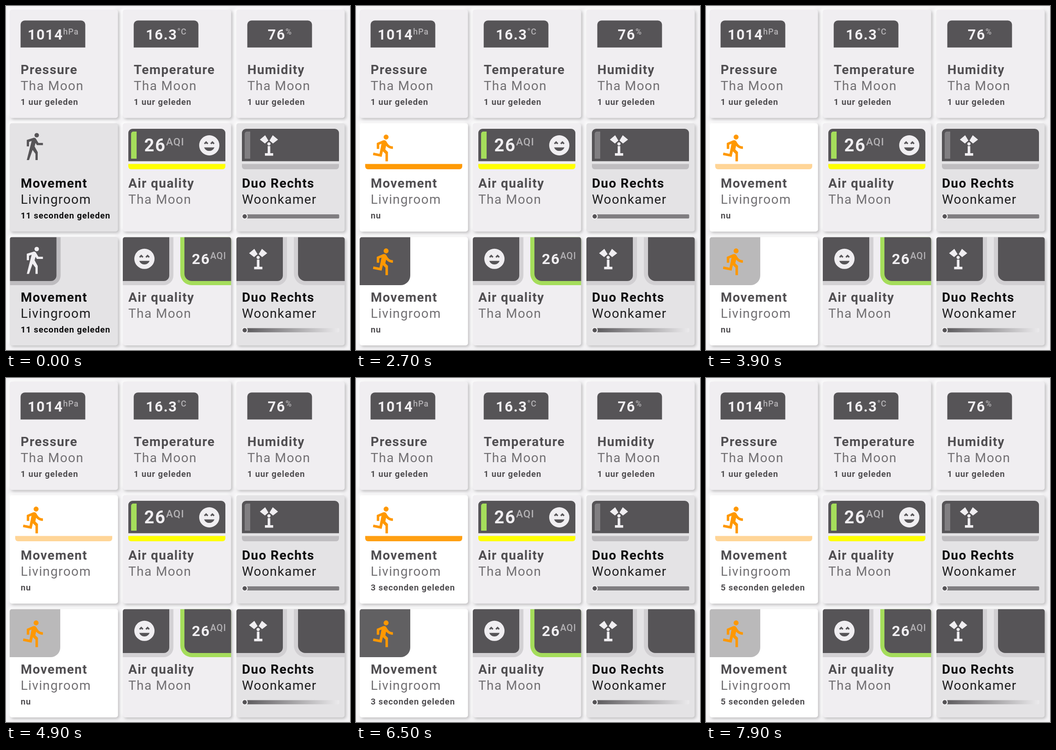
Write an HTML page with a canvas that moves like this. It is 748x748 px and loops after 8000 ms.

```html
<!DOCTYPE html>
<html lang="nl">
<head>
<meta charset="utf-8">
<title>Dashboard</title>
<style>
html, body { margin: 0; width: 100%; height: 100%; overflow: hidden; background: #f4f3f5; }
canvas { display: block; width: 748px; height: 748px; }
</style>
</head>
<body>
<canvas id="stage" width="748" height="748"></canvas>
<script>
const ctx = document.getElementById('stage').getContext('2d');
const LOOP = 8000, MOVE_AT = 2680;
const COLS = [8, 254, 501], ROWS = [8, 255, 502.5];
const DARK = '#565457', LIGHT = '#f0eef1', OFF = '#e4e3e5', MUTED = '#b4b2b5';
const TITLE = '#504e51', SUB = '#727073', BLACK = '#0c0c0d', ORANGE = '#ff9800';

const WALK = new Path2D('M14.12,10H19V8.2H15.38L13.38,4.87C13.08,4.37 12.54,4.03 11.92,4.03C11.74,4.03 11.58,4.06 11.42,4.11L6,5.8V11H7.8V7.33L9.91,6.67L6,22H7.8L10.67,13.89L13,17V22H14.8V15.59L12.31,11.05L13.04,8.18M14,3.8A1.8,1.8 0 1,0 14,.2A1.8,1.8 0 1,0 14,3.8Z');
const RUN = new Path2D('M13.49,5.48A2,2 0 1,0 13.49,1.48A2,2 0 1,0 13.49,5.48M9.89,19.38L10.89,14.98L12.99,16.98V22.98H14.99V15.48L12.89,13.48L13.49,10.48C14.79,11.98 16.79,12.98 18.99,12.98V10.98C17.09,10.98 15.49,9.98 14.69,8.58L13.69,6.98C13.29,6.38 12.69,5.98 11.99,5.98C11.69,5.98 11.49,6.08 11.19,6.08L5.99,8.28V12.98H7.99V9.58L9.79,8.88L8.19,16.98L3.29,15.98L2.89,17.98Z');
const SMILE = new Path2D('M12,2A10,10 0 1,0 12,22A10,10 0 1,0 12,2M8.88,7.82L11,9.94L9.94,11L8.88,9.94L7.82,11L6.76,9.94L8.88,7.82M12,17.5C9.67,17.5 7.69,16.04 6.89,14H17.11C16.31,16.04 14.33,17.5 12,17.5M16.18,11L15.12,9.94L14.06,11L13,9.94L15.12,7.82L17.24,9.94L16.18,11Z');
const LAMP = new Path2D('M0,9.5L11.5,0L18.5,11.5L11,18ZM28,0L39.5,9.5L28.5,18L21,11.5ZM19.8,15.2A3.6,3.6 0 1,1 19.7,15.2ZM17,23.5H22.6V39H29V44.5H11V39H17Z');

// The CSS "ease" curve
function ease(x) {
  const bez = (a, b, u) => 3 * a * u * (1 - u) ** 2 + 3 * b * u * u * (1 - u) + u ** 3;
  let lo = 0, hi = 1;
  for (let i = 0; i < 24; i++) {
    const mid = (lo + hi) / 2;
    if (bez(.25, .25, mid) < x) lo = mid; else hi = mid;
  }
  return bez(.1, 1, lo);
}

function blink(t) {
  const p = (t - MOVE_AT) / 1000 % 1;
  return p < .5 ? 1 - .8 * ease(p * 2) : .2 + .8 * ease(p * 2 - 1);
}

function box(x, y, w, h, color, radius = 0) {
  ctx.fillStyle = color;
  ctx.beginPath();
  ctx.roundRect(x, y, w, h, radius);
  ctx.fill();
}

function icon(path, x, y, scale, color) {
  ctx.save();
  ctx.translate(x, y);
  ctx.scale(scale, scale);
  ctx.fillStyle = color;
  ctx.fill(path);
  ctx.restore();
}

function font(size, weight) {
  ctx.font = `${weight} ${size}px Roboto, sans-serif`;
  ctx.letterSpacing = size * .05 + 'px';
}

function text(str, x, y, size, weight, color) {
  font(size, weight);
  ctx.fillStyle = color;
  ctx.fillText(str, x, y);
  return ctx.measureText(str).width;
}

function value(num, unit, x, y, size, unitSize, rise) {
  const w = text(num, x, y, size, 700, LIGHT);
  text(unit, x + w, y - rise, unitSize, 500, MUTED);
}

function centeredValue(num, unit, cx, y) {
  font(31, 700);
  let w = ctx.measureText(num).width;
  font(18, 500);
  w += ctx.measureText(unit).width;
  value(num, unit, cx - w / 2, y, 31, 18, 11.5);
}

function labels(x, y, title, sub, note, on = true) {
  text(title, x, y + 140, 28, 700, on ? TITLE : BLACK);
  text(sub, x, y + 175, 28, 400, on ? SUB : '#1d1d1e');
  if (note) text(note, x, y + 207, 18.5, 700, on ? TITLE : BLACK);
}

function card(x, y, color) {
  ctx.save();
  for (const [d, shade] of [[-3, '#fff'], [3, 'rgba(0,0,0,.22)']]) {
    ctx.shadowColor = shade;
    ctx.shadowBlur = 6;
    ctx.shadowOffsetX = ctx.shadowOffsetY = d;
    box(x, y, 235.5, 235.5, color, 5);
  }
  ctx.restore();
}

function inCard(x, y, draw) {
  ctx.save();
  ctx.beginPath();
  ctx.roundRect(x, y, 235.5, 235.5, 5);
  ctx.clip();
  draw();
  ctx.restore();
}

function leftTile(x, y, edge) {
  box(x, y, 110, 104.5, edge, [0, 0, 21, 0]);
  box(x, y, 101, 95.5, DARK, [0, 0, 12, 0]);
}

function rightTile(x, y, edge) {
  box(x + 125, y, 111, 104.5, edge, [0, 0, 0, 25]);
  box(x + 134, y, 102, 95.5, DARK, [0, 0, 0, 16]);
}

function panel(x, y, strip, bar) {
  box(x + 12, y + 12, 211, 70.5, DARK, [9, 9, 0, 0]);
  box(x + 18, y + 18, 12, 59, strip, [5, 0, 0, 0]);
  box(x + 12, y + 88.5, 211, 11.5, bar, [0, 0, 6, 6]);
}

function knob(x, y) {
  for (const [r, color] of [[6.8, '#f4f3f5'], [4.7, DARK]]) {
    ctx.fillStyle = color;
    ctx.beginPath();
    ctx.arc(x, y, r, 0, 7);
    ctx.fill();
  }
}

function slider(x, y, color) {
  box(x, y - 4.5, 211, 9, color, 2);
  knob(x + 5.5, y);
}

function climate() {
  const items = [['1014', 'hPa', 'Pressure'], ['16.3', '°C', 'Temperature'], ['76', '%', 'Humidity']];
  items.forEach(([num, unit, title], i) => {
    const x = COLS[i], y = ROWS[0];
    card(x, y, LIGHT);
    box(x + 23.7, y + 23.5, 140.7, 58.7, DARK, [9, 9, 0, 0]);
    centeredValue(num, unit, x + 94.5, 73);
    labels(x + 23.7, y, title, 'Tha Moon', '1 uur geleden');
  });
}

function movement(t) {
  const on = t >= MOVE_AT, x = COLS[0], glow = on ? blink(t) : 1;
  const note = !on ? '11 seconden geleden'
    : t < 5150 ? 'nu' : t < 7250 ? '3 seconden geleden' : '5 seconden geleden';
  for (const y of ROWS.slice(1)) {
    const bottom = y === ROWS[2];
    card(x, y, on ? '#fff' : OFF);
    inCard(x, y, () => {
      ctx.globalAlpha = glow;
      if (bottom && on) box(x, y, 110, 104.5, DARK, [0, 0, 21, 0]);
      else if (bottom) leftTile(x + .7, y, '#bebcbf');
      else if (on) box(x + 12, y + 88.5, 211, 11.5, ORANGE, [0, 0, 6, 6]);
    });
    icon(on ? RUN : WALK, 29, y + 20.6, 2.7, on ? ORANGE : bottom ? LIGHT : DARK);
    labels(x + 24, y, 'Movement', 'Livingroom', note, on);
  }
}

function air() {
  const x = COLS[1], [, mid, low] = ROWS, green = '#a5dd5b';
  card(x, mid, LIGHT);
  panel(x, mid, green, '#ffff00');
  value('26', 'AQI', 300.5, 316, 38, 22.5, 13);
  icon(SMILE, 415.6, 276.6, 2.2, LIGHT);
  card(x, low, LIGHT);
  inCard(x, low, () => {
    leftTile(x, low, '#d3d1d4');
    rightTile(x, low, green);
  });
  icon(SMILE, 274.6, 523.4, 2.2, LIGHT);
  value('26', 'AQI', 404, 561, 32, 19.8, 11);
  for (const y of [mid, low]) labels(x + 12, y, 'Air quality', 'Tha Moon');
}

function lights() {
  const x = COLS[2], [, mid, low] = ROWS;
  card(x, mid, OFF);
  panel(x, mid, '#807e81', '#bfbdc0');
  icon(LAMP, 552, 281, 1, LIGHT);
  slider(513.5, 457.5, '#807e81');
  card(x, low, OFF);
  inCard(x, low, () => {
    leftTile(x, low, '#d1cfd2');
    rightTile(x, low, '#d1cfd2');
  });
  icon(LAMP, 528.5, 528, 1, LIGHT);
  const fade = ctx.createLinearGradient(513, 0, 724, 0);
  fade.addColorStop(0, DARK);
  fade.addColorStop(1, '#ebeaec');
  slider(513.5, 705, fade);
  for (const y of [mid, low]) labels(x + 12, y, 'Duo Rechts', 'Woonkamer', '', false);
}

function frame(now) {
  const t = now % LOOP;
  ctx.fillStyle = '#f4f3f5';
  ctx.fillRect(0, 0, 748, 748);
  climate();
  movement(t);
  air();
  lights();
  requestAnimationFrame(frame);
}

const start = performance.now();
requestAnimationFrame(function first() {
  const tick = () => frame(Math.max(0, performance.now() - start));
  window.requestAnimationFrame = (raf => () => raf(tick))(window.requestAnimationFrame.bind(window));
  tick();
});
</script>
</body>
</html>
```
